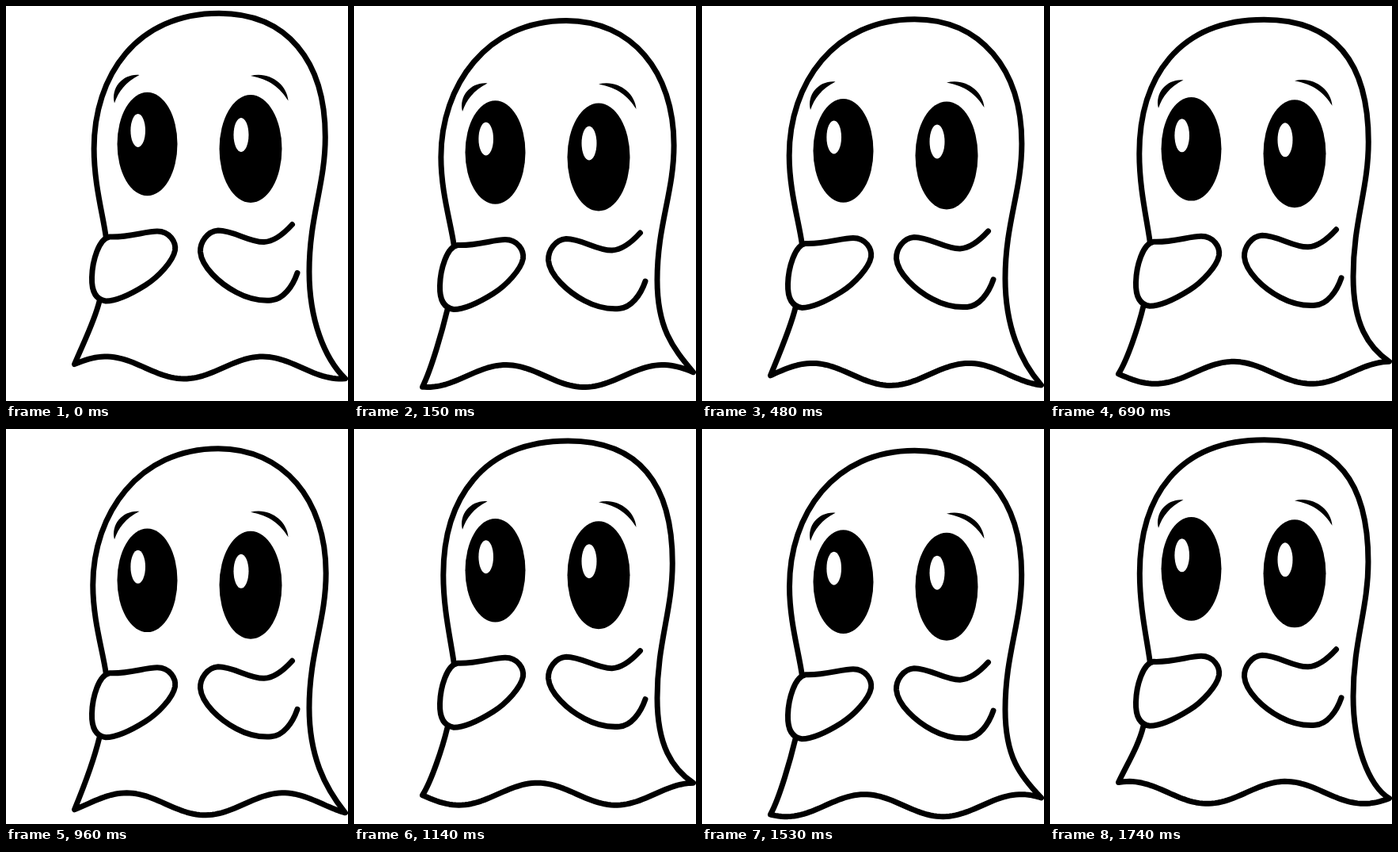
Write an HTML page that moves like this. It is 432 px wide and 498 px high and loops after 1770 ms.

```html
<!DOCTYPE html>
<html lang="en">
<head>
<meta charset="utf-8">
<title>Bobbing ghost</title>
<style>
html, body { margin: 0; width: 100%; height: 100%; overflow: hidden; background: #fff; }
svg { display: block; width: 432px; height: 498px; }
.line { fill: #fff; stroke: #000; stroke-width: 7; stroke-linecap: round; stroke-linejoin: round; }
</style>
</head>
<body>
<svg viewBox="0 0 432 498">
  <path id="body" class="line"/>
  <g id="face">
    <path d="M168.500 87C149 85 132 102 137 122.500C142 108 151 96 168.500 87Z"/>
    <path d="M309 88C332 82 355 98 356.500 119.500C346 103 333 92.500 309 88Z"/>
    <ellipse cx="178.500" cy="174" rx="38" ry="65.300"/>
    <ellipse cx="309" cy="180" rx="39.500" ry="68"/>
    <g fill="#fff">
      <ellipse cx="166.700" cy="157" rx="9.300" ry="21"/>
      <ellipse cx="297" cy="162.500" rx="9.500" ry="21.500"/>
    </g>
    <path class="line" d="M131 291C155 292 176 284 191 284C207 284 215 298 213.500 308
      C211 322 192 342 176 352C160 362 140 372 126 372C112 370 108 358 108.500 342
      C109 322 117 293 131 291Z"/>
    <path class="line" fill="none" d="M361.500 275.500C351 287 338 297 326 297.500C307 298 288 283 268 283
      C254 284 245 298 245.500 310C247 329 270 350 291 361C304 368 320 372 335 371
      C350 370 362 354 368 336.500"/>
  </g>
</svg>
<script>
const STEP = 30, STEPS = 59;
const TAU = Math.PI * 2;
const WAVE = { length: 198, period: 15, crest: 126, height: 14, level: 456 };
const LEFT = 86.5, RIGHT = 428.5;
const bobKeys = [0, 10, 20, 30, 40, 50, STEPS];
const body = document.getElementById('body');
const face = document.getElementById('face');

// Straight-line bob between alternating high and low keys
function bob(n) {
  const i = bobKeys.findIndex((k, j) => n >= k && n < bobKeys[j + 1]);
  const u = (n - bobKeys[i]) / (bobKeys[i + 1] - bobKeys[i]);
  return 21 * (i % 2 ? 1 - u : u);
}

function hemY(x, n) {
  const phase = (x - WAVE.crest) / WAVE.length - n / WAVE.period;
  return WAVE.level - WAVE.height * Math.cos(TAU * phase);
}

// The wave also flattens the dome a little: 0 is round, 1 is squarest
function flatten(n) {
  const d = (1 + Math.cos(TAU * (n - 10.8) / WAVE.period)) / 2;
  return d * d * (3 - 2 * d);
}

function bodyPath(n) {
  const s = flatten(n);
  const top = 7.8 + 4 * s, l = 109.700 + 4 * s, r = 404.2 - 2.5 * s;
  const apex = 268 + 3 * s;
  let d = `M${LEFT} ${hemY(LEFT, n)}C98 ${hemY(98, n) - 23} 112 397 118 372` +
    `C122 352 128 320 126.5 293C123 265 ${l} 225 ${l} 180` +
    `C${l} ${90 - 7 * s} ${168 - 8 * s} ${top} ${apex} ${top}` +
    `C${350 + 14 * s} ${top} ${r} ${72 - 8 * s} ${r} 165` +
    `C${r} 225 383 265 383 335` +
    `C383 395 402 ${hemY(402, n) - 23} ${RIGHT} ${hemY(RIGHT, n)}`;
  for (let x = RIGHT - 4; x > LEFT; x -= 4) d += `L${x} ${hemY(x, n).toFixed(2)}`;
  return d + 'Z';
}

function draw(ms) {
  const n = Math.floor(ms / STEP) % STEPS;
  const shift = `translate(0 ${bob(n).toFixed(2)})`;
  body.setAttribute('d', bodyPath(n));
  body.setAttribute('transform', shift);
  face.setAttribute('transform', shift);
}

const start = performance.now();
function tick() {
  draw(performance.now() - start);
  requestAnimationFrame(tick);
}
tick();
</script>
</body>
</html>
```
